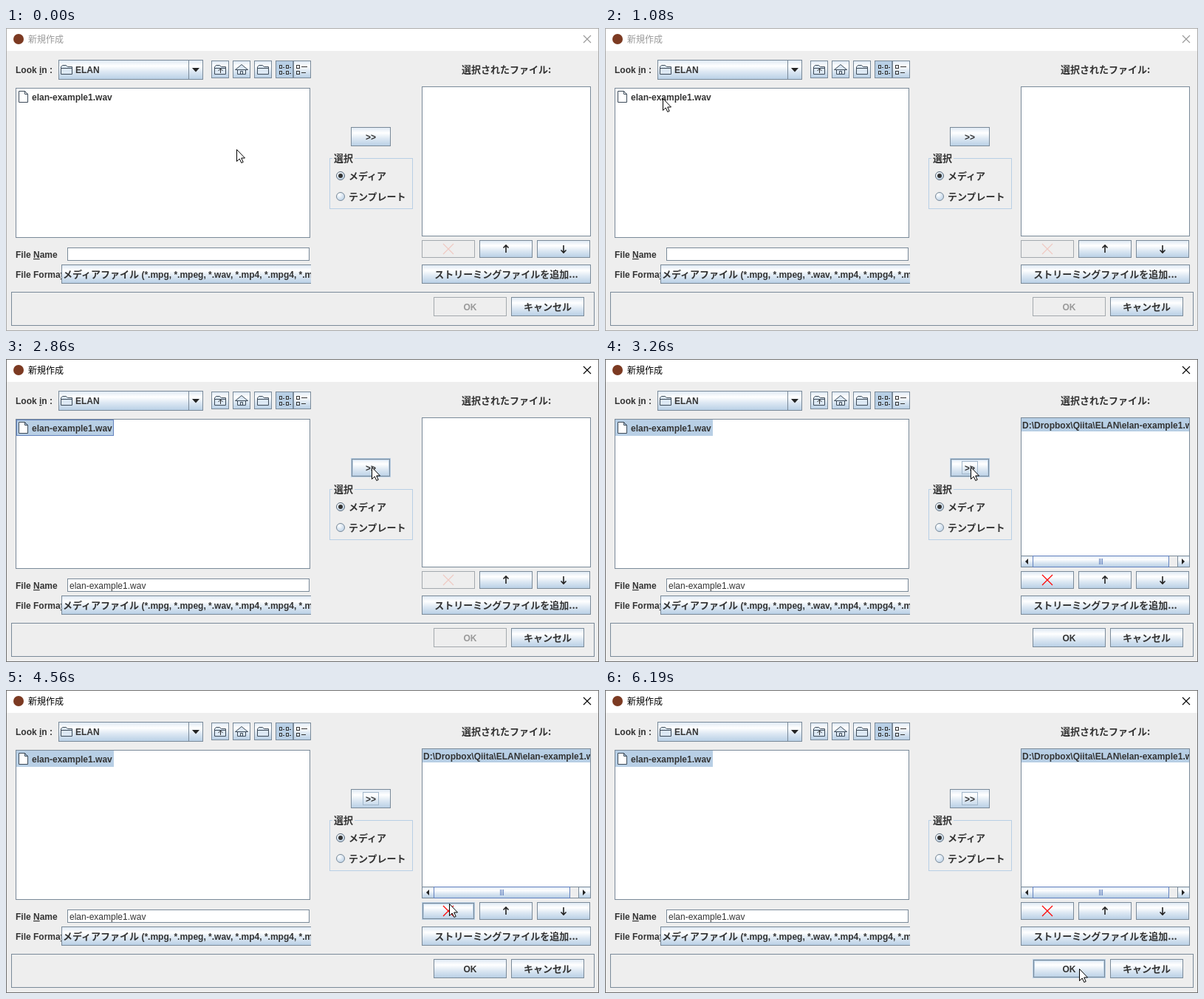
Animation, 803 px wide and 410 px high, one loop 6260 ms. Source, as an HTML page:

```html
<!DOCTYPE html>
<html lang="ja">
<head>
<meta charset="utf-8">
<title>新規作成</title>
<style>
html, body { margin: 0; width: 100%; height: 100%; overflow: hidden; background: #eee; }
svg { display: block; }
text { font: bold 12px "Liberation Sans", Arial, sans-serif; fill: #333; white-space: pre; }
.ja { font: bold 13px "Noto Sans CJK JP", "Noto Sans CJK", sans-serif; }
.plain { font-weight: normal; }
.title { font: 12px "Noto Sans CJK JP", "Noto Sans CJK", sans-serif; fill: var(--title); }
.mid { text-anchor: middle; }
.u { text-decoration: underline; }
rect, .crisp { shape-rendering: crispEdges; }
.base { fill: url(#face); stroke: #7a8a99; }
.ring { fill: none; display: none; }
.over .ring { display: inline; }
.over .base { stroke: #b8cfe5; }
.down .base { fill: #b8cfe5; }
.off .base { fill: #eee; stroke: #a3a9ae; }
.off text { fill: #999; }
.box { fill: #fff; stroke: #7a8a99; }
.line { fill: none; stroke: #333; }
.icon { fill: #dce8f4; stroke: #3c4a58; }
.sel { fill: #b8cfe5; }
</style>
</head>
<body>
<svg id="stage" width="803" height="410" viewBox="0 0 803 410">
  <defs>
    <linearGradient id="face" x2="0" y2="1">
      <stop stop-color="#dde8f3"/><stop offset=".3" stop-color="#fff"/>
      <stop offset=".6" stop-color="#dde8f3"/><stop offset="1" stop-color="#b8cfe5"/>
    </linearGradient>
    <radialGradient id="knob" cx=".35" cy=".3" r=".8">
      <stop stop-color="#fff"/><stop offset="1" stop-color="#b8cfe5"/>
    </radialGradient>
    <clipPath id="fileClip"><rect x="564" y="80" width="227" height="186"/></clipPath>
    <clipPath id="formatClip"><rect x="70" y="318" width="343" height="32"/></clipPath>
    <path id="folder" d="M.5 12.5V2.5L2.5 .5H7.5L9.5 2.5H15.5V12.5ZM.5 4.5H15.5"/>
  </defs>

  <rect width="803" height="410" fill="#eee"/>
  <rect width="803" height="31" fill="#fff"/>
  <rect id="frame" x=".5" y=".5" width="802" height="409" fill="none"/>
  <circle cx="17" cy="15" r="7" fill="#7c3a22"/>
  <text class="title" x="30" y="20">新規作成</text>
  <path d="M782 10L792 20M792 10L782 20" style="stroke:var(--title)" stroke-width="1.1"/>

  <text x="13" y="61">Look <tspan class="u">i</tspan>n :</text>
  <text x="13" y="311">File <tspan class="u">N</tspan>ame</text>
  <text x="13" y="338">File Forma<tspan class="u">t</tspan></text>
  <text class="ja" x="617" y="61">選択されたファイル:</text>

  <rect class="box" x="13.5" y="81.5" width="398" height="202"/>
  <rect class="box" x="83.5" y="297.5" width="327" height="17"/>
  <rect class="box" x="563.5" y="79.5" width="228" height="202"/>
  <rect x="7.5" y="357.5" width="789" height="45" fill="none" stroke="#7a8a99"/>

  <rect id="cell" class="sel" x="14" y="82" width="132" height="22"/>
  <rect id="cellFocus" x="14.5" y="82.5" width="131" height="21" fill="none" stroke="#6382bf"/>
  <path d="M17.5 85.5H25.5L29.5 89.5V100.5H17.5ZM25.5 85.5V89.5H29.5" fill="#fff" stroke="#3c4a58"/>
  <text x="35" y="98">elan-example1.wav</text>
  <text id="name" class="plain" x="86" y="311">elan-example1.wav</text>

  <rect x="438.5" y="176.5" width="112" height="68" fill="none" stroke="#b8cfe5"/>
  <rect x="442" y="175" width="30" height="4" fill="#eee"/>
  <text class="ja" x="444" y="181">選択</text>
  <circle cx="453" cy="200" r="5.5" fill="url(#knob)" stroke="#5d6c7b"/>
  <circle cx="453" cy="200" r="3" fill="#333"/>
  <circle cx="453" cy="228" r="5.5" fill="url(#knob)" stroke="#7a8a99"/>
  <text class="ja" x="464" y="205">メディア</text>
  <text class="ja" x="464" y="233">テンプレート</text>

  <g id="buttons"></g>

  <path class="crisp" d="M247.5 44V69" stroke="#7a8a99"/>
  <path d="M252 54H262L257 59.5Z" fill="#222"/>
  <use href="#folder" class="icon" x="74" y="50"/>
  <text x="94" y="61">ELAN</text>
  <use href="#folder" class="icon" x="282" y="50"/>
  <path class="line" d="M290.5 61V55M287.5 58L290.5 55L293.5 58"/>
  <path class="icon" d="M313.5 56V62.5H324.5V56M310.5 56.5L319 49.5L327.5 56.5ZM317.5 62V58.5H320.5V62"/>
  <use href="#folder" class="icon" x="340" y="50"/>
  <g id="grid" class="line"></g>
  <path class="line crisp" d="M393.5 50.5H397.5V54.5H393.5ZM393.5 58.5H397.5V62.5H393.5ZM400 52.5H408M400 60.5H406"/>

  <g clip-path="url(#formatClip)">
    <rect class="base" x="75.5" y="320.5" width="400" height="25"/>
    <text x="77" y="338"><tspan class="ja">メディアファイル</tspan> (*.mpg, *.mpeg, *.wav, *.mp4, *.mpg4, *.m4v)</text>
  </g>

  <g id="added">
    <g clip-path="url(#fileClip)">
      <rect class="sel" x="564" y="80" width="227" height="18"/>
      <text x="565" y="94">D:\Dropbox\Qiita\ELAN\elan-example1.wav</text>
    </g>
    <rect x="564" y="266" width="227" height="15" fill="#eee"/>
    <path class="crisp" d="M564 266.5H791" stroke="#7a8a99"/>
    <rect class="base" x="563.5" y="266.5" width="16" height="15"/>
    <rect class="base" x="775.5" y="266.5" width="16" height="15"/>
    <rect class="base" x="579.5" y="266.5" width="184" height="15" style="stroke:#6382bf"/>
    <path d="M573 270V278L569 274ZM781 270V278L785 274Z" fill="#222"/>
    <path class="crisp" d="M669.5 270V278M671.5 270V278M673.5 270V278" stroke="#6382bf"/>
  </g>
  <rect id="focus" x="483.5" y="138.5" width="21" height="17" fill="none" stroke="#a3b8cc"/>
  <path id="cross" d="M592 292L606 306M606 292L592 306" stroke-width="1.2"/>
  <path d="M677 304V294M673.5 297.5L677 294L680.5 297.5M755 294V304M751.5 300.5L755 304L758.5 300.5" fill="none" stroke="#222" stroke-width="1.6"/>

  <path id="cursor" d="M.5 .5V16.5L4.2 13L6.8 18.5L9.2 17.4L6.7 12H11.5Z" fill="#fff" stroke="#000"/>
</svg>
<script>
const LOOP = 6260;
const $ = id => document.getElementById(id);

function add(parent, tag, attrs, text) {
  const el = document.createElementNS('http://www.w3.org/2000/svg', tag);
  for (const key in attrs) el.setAttribute(key, attrs[key]);
  if (text) el.textContent = text;
  parent.appendChild(el);
  return el;
}

function button(x, y, w, h, label, cls = '') {
  const g = add($('buttons'), 'g');
  const box = (inset, attrs) => add(g, 'rect', {
    x: x + inset + .5, y: y + inset + .5,
    width: w - 1 - 2 * inset, height: h - 1 - 2 * inset, ...attrs
  });
  box(0, { class: 'base' });
  box(1, { class: 'ring', stroke: '#7a8a99' });
  box(2, { class: 'ring', stroke: '#b8cfe5' });
  if (label) add(g, 'text', { x: x + w / 2, y: y + h / 2 + (cls ? 5 : 4.5), class: 'mid ' + cls }, label);
  return { g, hit: (px, py) => px >= x && px < x + w && py >= y && py < y + h };
}

button(71, 43, 196, 27);
for (const x of [278, 307, 336, 389]) button(x, 44, 24, 24);
button(365, 44, 24, 24).g.setAttribute('class', 'down');
for (const x of [370, 379])
  for (const y of [50, 58]) {
    add($('grid'), 'rect', { x: x + .5, y: y + .5, width: 3, height: 4 });
    add($('grid'), 'path', { d: `M${x + 5} ${y + 3.5}h2`, class: 'crisp' });
  }

const move = button(467, 134, 54, 26, '>>');
const remove = button(563, 287, 72, 24);
const ok = button(579, 364, 99, 26, 'OK');
const live = [
  move, remove, ok,
  button(641, 287, 72, 24),
  button(719, 287, 72, 24),
  button(563, 320, 229, 26, 'ストリーミングファイルを追加...', 'ja'),
  button(684, 364, 99, 26, 'キャンセル', 'ja')
];

const linear = u => u;
const easeIn = u => u ** 1.8;
const easeOut = u => 1 - (1 - u) ** 1.6;
const smooth = u => u * u * (3 - 2 * u);

// first step, last step, step count, end point, easing
const START = [312, 164];
const MOVES = [
  [70, 620, 8, [123, 110], smooth],
  [700, 940, 4, [78, 98], easeOut],
  [1080, 1080, 1, [78, 95], linear],
  [2400, 2860, 7, [495, 146], smooth],
  [3870, 4180, 5, [522, 167], easeIn],
  [4250, 4490, 4, [585, 251], linear],
  [4560, 4860, 5, [636, 377], easeOut],
  [6190, 6190, 1, [642, 377], linear]
];

function cursorAt(t) {
  let from = START;
  for (const [t0, t1, n, to, ease] of MOVES) {
    if (t < t0) break;
    if (t < t1) {
      const step = 1 + Math.floor((t - t0) / (t1 - t0) * (n - 1) + .02);
      const k = ease(step / n);
      return from.map((v, i) => Math.round(v + (to[i] - v) * k));
    }
    from = to;
  }
  return from;
}

const show = (id, on) => $(id).style.display = on ? '' : 'none';

function render(t) {
  const [x, y] = cursorAt(t);
  const active = t >= 1480;
  const pressed = t >= 3180 && t < 3260;
  const added = t >= 3260;

  $('stage').style.setProperty('--title', active ? '#000' : '#999');
  $('frame').setAttribute('stroke', active ? '#707070' : '#aaa');
  show('cell', active);
  show('cellFocus', active && t < 3180);
  show('name', t >= 1560);
  show('added', added);
  show('focus', t >= 3180);
  $('cross').setAttribute('stroke', added ? '#f00' : '#efc9c2');

  for (const b of live) {
    const off = !added && (b === remove || b === ok);
    const state = off ? 'off' : b === move && pressed ? 'down' : b.hit(x, y) ? 'over' : '';
    b.g.setAttribute('class', state);
  }
  $('cursor').setAttribute('transform', `translate(${x} ${y})`);
}

const begin = performance.now();
function tick() {
  render((performance.now() - begin) % LOOP);
  requestAnimationFrame(tick);
}
tick();
</script>
</body>
</html>
```
